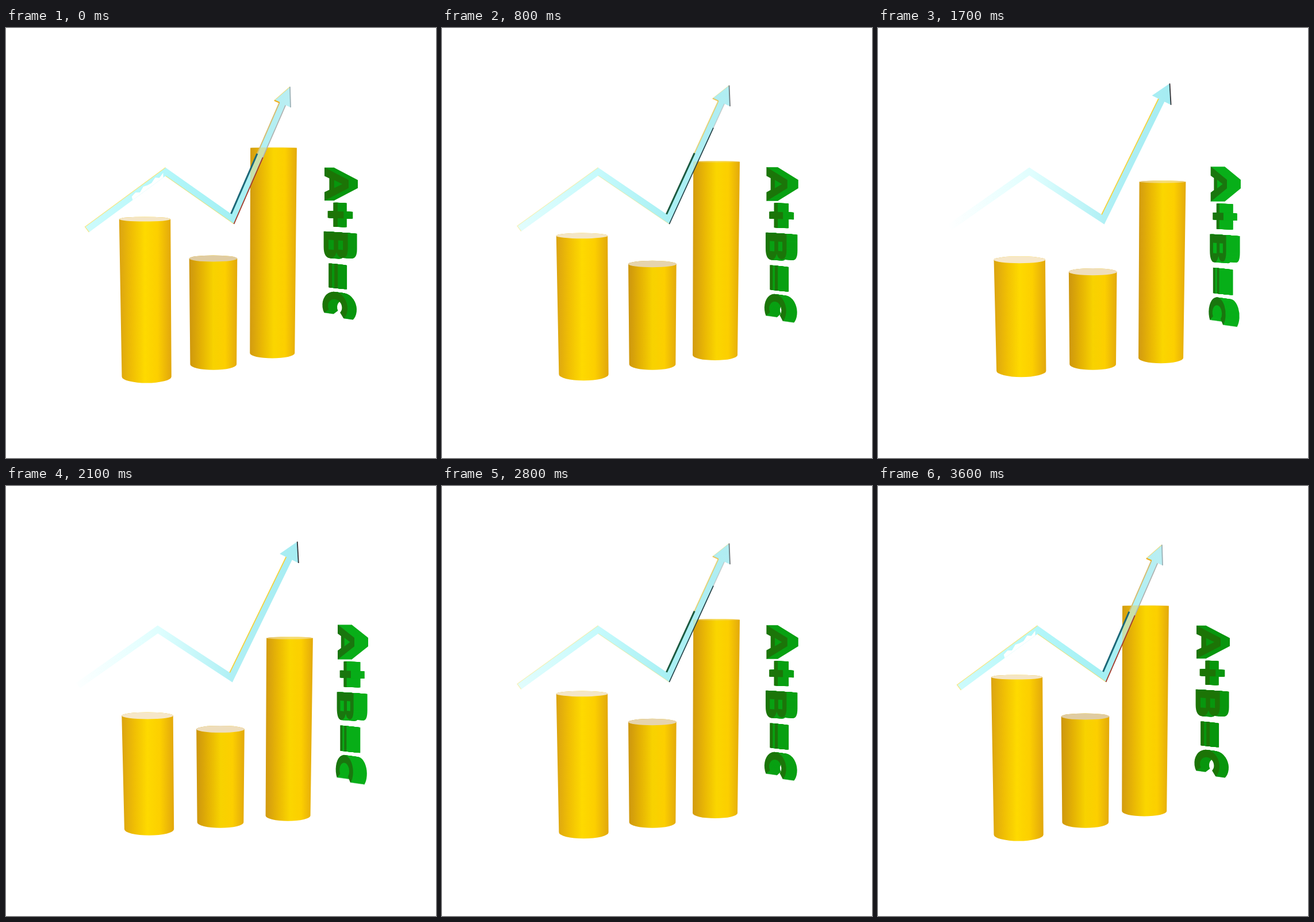
These frames come from a looping animation (748x748 px, 3.7 s). An HTML page with a canvas:

```html
<!DOCTYPE html>
<html lang="en">
<head>
<meta charset="utf-8">
<title>Growth chart</title>
<style>
  html, body { margin: 0; width: 100%; height: 100%; overflow: hidden; background: #fff; }
  canvas { display: block; width: 748px; height: 748px; }
</style>
</head>
<body>
<canvas id="stage" width="748" height="748" role="img" aria-label="Three bars, a rising arrow and A+B=C"></canvas>
<script>
const ctx = document.getElementById('stage').getContext('2d');
const { PI, sin, cos, max, min, floor, hypot } = Math;
const clamp = x => max(0, min(1, x));
const mix = (a, b, k) => a + (b - a) * k;
const blend = (a, b, k) => a.map((v, i) => mix(v, b[i], k));
const rgb = (a, b, k) => `rgb(${blend(a, b, k).join()})`;
const shift = ([x, y], [dx, dy], d) => [x + dx * d, y + dy * d];

// Centre, top and base at both ends of the swing
const bars = [
  { from: [241.5, 332.5, 606.5], to: [246, 399.5, 597], half: 44.7, shade: .03 },
  { from: [360.5, 401, 585], to: [373, 423, 585], half: 41.8, shade: .2 },
  { from: [465.5, 208.5, 565.5], to: [493.5, 264.5, 573.5], half: 40.4, shade: .12 }
];
const gold = ['#dda612', '#f2c104', '#ffdb00', '#fccf00', '#e3a90c'];

// Centre line of the arrow: tail, peak, valley, neck
const arrow = {
  from: [[141, 350.5], [277.5, 250], [394, 332], [481, 132]],
  to: [[125.5, 347], [264, 249.5], [391.5, 333], [492.5, 126]]
};

// Letters lie on their side: x is 0..1 from foot to top, y is in pixels
const arch = new Path2D();
arch.ellipse(.5, 0, .52, 26, 0, 2.6, .8 + 2 * PI);
arch.ellipse(.5, 0, .29, 13, 0, .75 + 2 * PI, 2.65, true);
arch.closePath();
const glyphs = [
  'M0-29L1-7V7L0 29V14L.2 10V-10L0-14ZM.4-7L.74 0L.4 7Z',
  'M.15-6H.38V-21H.56V-6H.81V6H.56V21H.38V6H.15Z',
  'M0-23H1V4Q1 21 .76 21Q.6 21 .53 12Q.45 23 .27 23Q0 23 0 4ZM.2-9V8H.42V-9ZM.6-9V7H.8V-9Z',
  'M.22-21H.36V21H.22ZM.46-21H.6V21H.46Z'
].map(d => new Path2D(d)).concat(arch);

function drawBar({ from, to, half, shade }, k) {
  const [x, top, base] = blend(from, to, k);
  const foot = x + (372 - x) * .024, footHalf = half * .965;
  const tilt = (y, r) => (y - 180) * r * .0006;
  const body = () => {
    ctx.beginPath();
    ctx.ellipse(x, top, half, tilt(top, half), 0, PI, 0);
    ctx.ellipse(foot, base, footHalf, tilt(base, footHalf), 0, 0, PI);
    ctx.closePath();
  };
  const side = ctx.createLinearGradient(x - half, 0, x + half, 0);
  gold.forEach((color, i) => side.addColorStop(i / 4, color));
  const dusk = ctx.createLinearGradient(x - half, 0, x + half, 0);
  dusk.addColorStop(0, `rgba(140,85,0,${shade})`);
  dusk.addColorStop(.75, 'rgba(140,85,0,0)');
  body();
  for (ctx.fillStyle of [side, dusk]) ctx.fill();
  ctx.beginPath();
  ctx.ellipse(x, top, half, tilt(top, half), 0, 0, 2 * PI);
  ctx.globalAlpha = clamp(tilt(top, half) / 3.5);
  ctx.fillStyle = rgb([247, 233, 203], [224, 204, 162], shade * 5 * (1 - k * .6));
  ctx.fill();
  ctx.globalAlpha = 1;
  return body;
}

function trace(points) {
  ctx.beginPath();
  points.forEach(p => ctx.lineTo(...p));
}

function line(points, color, width, alpha) {
  ctx.globalAlpha = clamp(alpha);
  ctx.strokeStyle = color;
  ctx.lineWidth = width;
  trace(points);
  ctx.stroke();
  ctx.globalAlpha = 1;
}

// Mitred edge at a signed distance from the centre line
function edge(points, normals, d) {
  return points.map((p, i) => {
    const a = normals[max(i - 1, 0)], b = normals[min(i, normals.length - 1)];
    return shift(p, [a[0] + b[0], a[1] + b[1]], d / (1 + a[0] * b[0] + a[1] * b[1]));
  });
}

function drawArrow(k, lastBar) {
  const mid = arrow.from.map((p, i) => blend(p, arrow.to[i], k));
  const normals = mid.slice(1).map(([x, y], i) => {
    const dx = x - mid[i][0], dy = y - mid[i][1], len = hypot(dx, dy);
    return [-dy / len, dx / len];
  });
  const upper = edge(mid, normals, -5.8), lower = edge(mid, normals, 5.8);
  const [nx, ny] = normals[2], neck = mid[3], wing = mix(15.3, 18.2, k);
  const tip = shift(neck, [ny, -nx], 32.5);
  const headL = shift(neck, [nx, ny], -wing), headR = shift(neck, [nx, ny], wing);

  const glass = ctx.createLinearGradient(upper[0][0], 0, tip[0], 0);
  glass.addColorStop(0, rgb([205, 251, 252], [253, 255, 255], k));
  glass.addColorStop(.38, rgb([180, 247, 250], [222, 254, 254], k));
  glass.addColorStop(.7, rgb([164, 240, 244], [176, 240, 245], k));
  glass.addColorStop(1, rgb([186, 238, 242], [166, 236, 242], k));
  trace([...upper, headL, tip, headR, ...lower.slice().reverse()]);
  ctx.fillStyle = glass;
  ctx.fill();

  // The last bar shows faintly through the glass
  ctx.save();
  ctx.clip();
  lastBar();
  ctx.fillStyle = `rgba(240,200,60,${.4 * clamp(1 - k)})`;
  ctx.fill();
  ctx.restore();

  const fade = 1 - k;
  line([lower[0], upper[0], upper[1]], '#ffe05a', 1.2, fade * .8);
  line(lower.slice(1, 3), '#e9dc62', 1.2, fade * .7);

  // Ragged white reflection eating into the first rise
  const start = .57 + 1.1 * k, end = .97;
  if (start < end) {
    const along = f => blend(lower[0], lower[1], f);
    const rim = [along(start)];
    for (let i = 0; i <= 8; i++) {
      const f = mix(start, end, i / 8);
      rim.push(blend(along(f), blend(upper[0], upper[1], f), .5 + .22 * sin(i * 2.4)));
    }
    trace([...rim, along(end)]);
    ctx.fillStyle = '#fff';
    ctx.fill();
  }

  const left = (a, b) => [a, b].map(f => blend(upper[2], upper[3], f));
  const right = (a, b) => [a, b].map(f => blend(lower[2], lower[3], f));
  line(left(.5, 1), '#d6bd72', 2, fade);
  line(left(0, 1), '#f6d23c', 1.8, k);
  line(left(0, .54), rgb([29, 104, 120], [10, 75, 45], clamp(2 * k)), 3, (.85 - k) * 2.2);
  line(right(.5, 1), '#aeb0ae', 1.6, fade);
  line(right(0, .56), '#a33b2c', 1.8, 1 - 2.3 * k);
  line(right(0, .8), '#203f45', 1.6, sin(PI * clamp(k)));
  line([upper[3], headL, tip], '#f0cf48', 1.2, fade * .6);
  line([headL, upper[3]], '#f2ae18', 2.2, fade);
  line([tip, headR], rgb([150, 170, 175], [30, 25, 30], clamp(k)), 1.8, .9);
}

function drawLetters(k) {
  const width = mix(42, 29, k), depth = mix(16, 24, k), scale = mix(1, 1.054, k);
  const front = rgb([28, 116, 6], [25, 118, 14], k), side = rgb([8, 150, 14], [8, 174, 24], k);
  glyphs.forEach((glyph, i) => {
    const slope = i * .035, x = mix(554, 577, k) - i * .7, y = 271.5 + 52.6 * i * scale;
    for (let d = depth; d >= 0; d--) {
      ctx.setTransform(width, width * slope, 0, scale, x + d, y + d * slope);
      ctx.fillStyle = d < 1 ? front : side;
      ctx.fill(glyph, 'evenodd');
    }
  });
  ctx.setTransform(1, 0, 0, 1, 0, 0);
}

const start = performance.now();
function draw() {
  // Ten poses a second, out and back
  const step = floor((performance.now() - start) % 3700 / 100);
  const u = min(step, 36 - step) / 18;
  const k = ((1 - cos(PI * u)) / 2 - .015 * sin(2 * PI * u)) / .946;
  ctx.fillStyle = '#fff';
  ctx.fillRect(0, 0, 748, 748);
  const bodies = bars.map(bar => drawBar(bar, k));
  drawArrow(k, bodies[2]);
  drawLetters(k);
  requestAnimationFrame(draw);
}
draw();
</script>
</body>
</html>
```
